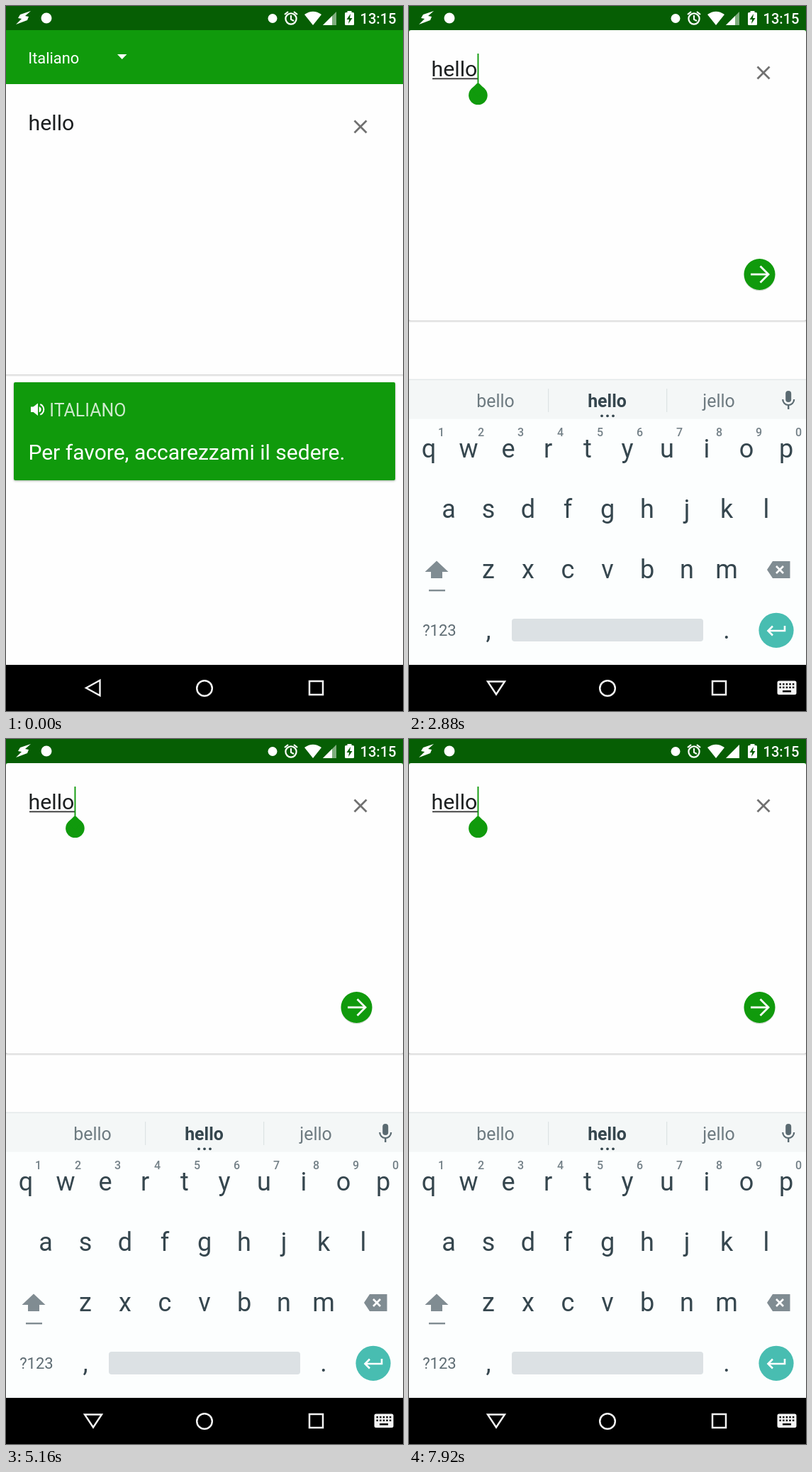
Recreate the animation shown at these times as an HTML page with a canvas. Size 560 by 993 pixels, loop 8000 ms.

```html
<!DOCTYPE html>
<html lang="it">
<head>
<meta charset="utf-8">
<title>Translator</title>
<style>
html, body { margin: 0; width: 100%; height: 100%; overflow: hidden; background: #fefefe; }
canvas { display: block; width: 560px; height: 993px; }
</style>
</head>
<body>
<canvas id="stage"></canvas>
<script>
const W = 560, H = 993, LOOP = 8000, TICK = 120;
const GREEN = '#109a0c', DARK = '#065e04', PAGE = '#fefefe', INK = '#1c1f20';
const KEY = '#35464e', KEY_ICON = '#808c92';
const BAR = 76, NAV = 928, KEYS_TOP = 581.5;

// start times of each switch to editing and back to the result
const OPENS = [1020, 4500, 7020];
const CLOSES = [3120, 5980];

const canvas = document.getElementById('stage');
const g = canvas.getContext('2d');
const dpr = window.devicePixelRatio || 1;
canvas.width = W * dpr;
canvas.height = H * dpr;

const clamp = x => Math.max(0, Math.min(1, x));
const ramp = (t, from, dur) => clamp((t - from) / dur);
const smooth = x => x * x * (3 - 2 * x);

function text(s, x, y, size, color, weight = 400, align = 'left') {
  g.font = `${weight} ${size}px Roboto, sans-serif`;
  g.textAlign = align;
  g.fillStyle = color;
  g.fillText(s, x, y);
}

function rect(x, y, w, h, color) {
  g.fillStyle = color;
  g.fillRect(x, y, w, h);
}

function round(x, y, w, h, r, color) {
  g.beginPath();
  g.roundRect(x, y, w, h, r);
  g.fillStyle = color;
  g.fill();
}

function disc(x, y, r, color) {
  g.beginPath();
  g.arc(x, y, r, 0, Math.PI * 2);
  g.fillStyle = color;
  g.fill();
}

function arc(x, y, r, from, to, width, color) {
  g.beginPath();
  g.arc(x, y, r, from, to);
  g.lineWidth = width;
  g.strokeStyle = color;
  g.stroke();
}

const ring = (x, y, r, width, color) => arc(x, y, r, 0, Math.PI * 2, width, color);

function path(pts, close) {
  g.beginPath();
  for (let i = 0; i < pts.length; i += 2) g.lineTo(pts[i], pts[i + 1]);
  if (close) g.closePath();
}

function poly(color, ...pts) {
  path(pts, true);
  g.fillStyle = color;
  g.fill();
}

function line(color, width, ...pts) {
  path(pts, false);
  g.lineWidth = width;
  g.strokeStyle = color;
  g.stroke();
}

function outline(color, width, ...pts) {
  path(pts, true);
  g.lineWidth = width;
  g.strokeStyle = color;
  g.stroke();
}

function cross(x, y, r, width, color) {
  line(color, width, x - r, y - r, x + r, y + r);
  line(color, width, x + r, y - r, x - r, y + r);
}

// everything the picture depends on, for one moment
function stateAt(t) {
  const last = list => Math.max(-1e5, ...list.filter(s => s <= t));
  const opened = last(OPENS), closed = last(CLOSES);
  const fullSignal = t >= 5500;
  if (opened > closed) {
    const u = t - opened, k = ramp(u, 430, 150);
    const shown = 1 - (1 - k) * (1 - k);
    return {
      fullSignal, edit: smooth(ramp(u, 0, 320)), result: 1 - ramp(u, 0, 240),
      caret: u > 250, nav: u > 300, keys: shown, strip: u > 620
    };
  }
  const u = t - closed, k = ramp(u, 430, 150);
  return {
    fullSignal, edit: 1 - smooth(ramp(u, 0, 300)), result: ramp(u, 180, 400),
    caret: false, nav: u < 220, keys: 1 - k * k, strip: u < 110
  };
}

function statusBar(fullSignal) {
  const w = '#fff';
  rect(0, 0, W, 34, DARK);
  poly(w, 35, 7, 20, 12, 17, 17, 22, 18, 14, 26, 30, 20, 32, 15, 27, 14);
  disc(57, 17, 7.5, w);
  disc(376, 17.5, 6.5, w);

  ring(402, 18, 7.6, 2.2, w);
  line(w, 2, 402, 13, 402, 19, 406, 21);
  line(w, 2.2, 393, 12, 398, 8);
  line(w, 2.2, 411, 12, 406, 8);

  g.beginPath();
  g.moveTo(433, 27);
  g.lineTo(421, 12);
  g.quadraticCurveTo(433, 3.5, 445, 12);
  g.closePath();
  g.fillStyle = w;
  g.fill();

  poly(fullSignal ? w : '#7fae7e', 447, 27, 466, 27, 466, 8);
  if (!fullSignal) poly(w, 447, 27, 460, 27, 460, 14);

  round(478, 9, 13, 18, 1.5, w);
  rect(481.5, 7, 6, 3, w);
  poly(DARK, 486, 11, 480.5, 19, 484, 19, 483, 25, 488.5, 17, 485, 17);
  text('13:15', 499.5, 25, 20.1, w, 500);
}

// the white content stays solid: only the green fades into the page
function resultCard(alpha) {
  if (alpha <= 0) return;
  g.save();
  g.globalAlpha = alpha;
  g.shadowColor = 'rgba(0,40,0,.35)';
  g.shadowBlur = 3 * dpr;
  g.shadowOffsetY = dpr;
  round(11, 530, 538, 138, 2, GREEN);
  g.restore();

  rect(35, 564.5, 5, 7.5, '#fff');
  poly('#fff', 38, 565, 45, 559.5, 45, 577, 38, 571.5);
  g.beginPath();
  g.arc(45.5, 568.3, 4.2, -1.3, 1.3);
  g.fillStyle = '#fff';
  g.fill();
  arc(45.5, 568.3, 7.8, -1.2, 1.2, 2, '#fff');
  text('ITALIANO', 61.3, 578, 24.9, 'rgba(255,255,255,.8)');
  text('Per favore, accarezzami il sedere.', 31.4, 638.5, 30.05, '#fff');
}

function inputCard(s) {
  const dy = -BAR * s.edit, y = 110 + dy;

  rect(0, 34, W, BAR, GREEN);
  text('Italiano', 31.3, 81 + dy, 21.8, '#fff');
  poly('#fff', 157, 68 + dy, 170.5, 68 + dy, 163.7, 75 + dy);

  rect(0, y + 408, W, 3.5, '#ececec');
  rect(0, y + 408, W, 1.8, '#cfcfcf');
  round(0, y, W, 409, 3 * s.edit, PAGE);
  text('hello', 31.6, 174.7 + dy, 30.3, INK);
  cross(500, 170 + dy, 8.5, 2.7, '#707070');

  if (s.strip) rect(33, 101.5, 64, 1.8, '#333');
  if (s.caret) {
    rect(96.5, 67, 1.9, 41, GREEN);
    disc(97.4, 125.8, 13.3, GREEN);
    poly(GREEN, 97.4, 107.5, 107, 117, 97.4, 128, 87.8, 117);
  }
  if (s.edit > 0) {
    g.save();
    g.globalAlpha = s.edit;
    disc(494.5, 379.3, 22, '#d4dcd4');
    disc(494.5, 378, 22, GREEN);
    line('#fff', 2.8, 482, 378, 506, 378);
    line('#fff', 2.8, 495.5, 366.5, 507, 378, 495.5, 389.5);
    g.restore();
  }
}

function strip() {
  rect(0, 526, W, KEYS_TOP - 526, '#f4f7f7');
  rect(0, 525.5, W, 1.5, '#e4e9ea');
  for (const x of [196, 363]) rect(x, 539, 1.2, 33, '#dde3e4');
  const base = 565;
  text('bello', 122, base, 24.9, '#6d7a80', 400, 'center');
  text('hello', 279.5, base, 24.9, KEY, 700, 'center');
  text('jello', 437, base, 24.9, '#6d7a80', 400, 'center');
  for (let i = -1; i < 2; i++) disc(280 + 8 * i, 577.3, 1.9, KEY);

  const c = '#5a6a71';
  round(531.2, 542, 8, 16, 4, c);
  arc(535.2, 554, 8, 0, Math.PI, 2.2, c);
  rect(534, 562, 2.4, 6, c);
}

function row(letters, x, y) {
  [...letters].forEach((c, i) => text(c, x + 56 * i, y, 36, KEY, 400, 'center'));
}

function keyboard(shown, withStrip) {
  if (shown <= 0) return;
  g.save();
  g.globalAlpha = shown;
  g.translate(0, 25 * (1 - shown));
  rect(0, KEYS_TOP, W, NAV - KEYS_TOP, '#fcfefe');
  rect(0, NAV, W, H - NAV, '#000');
  if (withStrip) strip();

  row('qwertyuiop', 28, 636);
  row('asdfghjkl', 56, 721);
  row('zxcvbnm', 112, 806);
  [...'1234567890'].forEach((c, i) =>
    text(c, 45.5 + 56 * i, 605.5, 16, '#748188', 500, 'center'));

  poly(KEY_ICON, 39, 781.5, 55.5, 797, 47, 797, 47, 806, 31, 806, 31, 797, 22.5, 797);
  rect(28, 822, 23, 2.4, KEY_ICON);

  poly(KEY_ICON, 505, 794, 513, 782, 537.5, 782, 537.5, 806, 513, 806);
  cross(523, 794, 5, 2.6, '#fff');

  text('?123', 19.2, 887, 22, '#5e6c73');
  text(',', 112, 891, 36, KEY, 400, 'center');
  text('.', 448, 891, 36, KEY, 400, 'center');
  round(145, 863, 270, 32, 4, '#dce1e4');

  disc(518, 879.3, 24.6, '#48bdb1');
  line('#fff', 2.6, 530, 873, 530, 880, 507, 880);
  line('#fff', 2.6, 513, 873.5, 506.5, 880, 513, 886.5);
  g.restore();
}

function navIcons(editing) {
  const w = '#f4f4f4';
  if (editing) {
    outline(w, 2.4, 111, 951.5, 135, 951.5, 123, 969.5);
    round(519.5, 950.5, 27, 19.5, 2.5, w);
    for (let r = 0; r < 2; r++)
      for (let i = 0; i < 5; i++) rect(522.5 + 4.6 * i, 954 + 4.6 * r, 2.4, 2.4, '#000');
    rect(527, 964, 12, 2.5, '#000');
  } else {
    outline(w, 2.4, 113, 960.5, 132.5, 949.8, 132.5, 971.2);
  }
  ring(280, 961, 10.8, 2.5, w);
  g.strokeRect(428, 951, 19, 19);
}

function draw(t) {
  const s = stateAt(t);
  g.setTransform(dpr, 0, 0, dpr, 0, 0);
  rect(0, 0, W, H, PAGE);
  resultCard(s.result);
  inputCard(s);
  statusBar(s.fullSignal);
  rect(0, NAV, W, H - NAV, '#000');
  keyboard(s.keys, s.strip);
  navIcons(s.nav);
}

const begin = performance.now();
function frame() {
  const t = (performance.now() - begin) % LOOP;
  draw(Math.floor(t / TICK) * TICK);
  requestAnimationFrame(frame);
}
frame();
</script>
</body>
</html>
```
